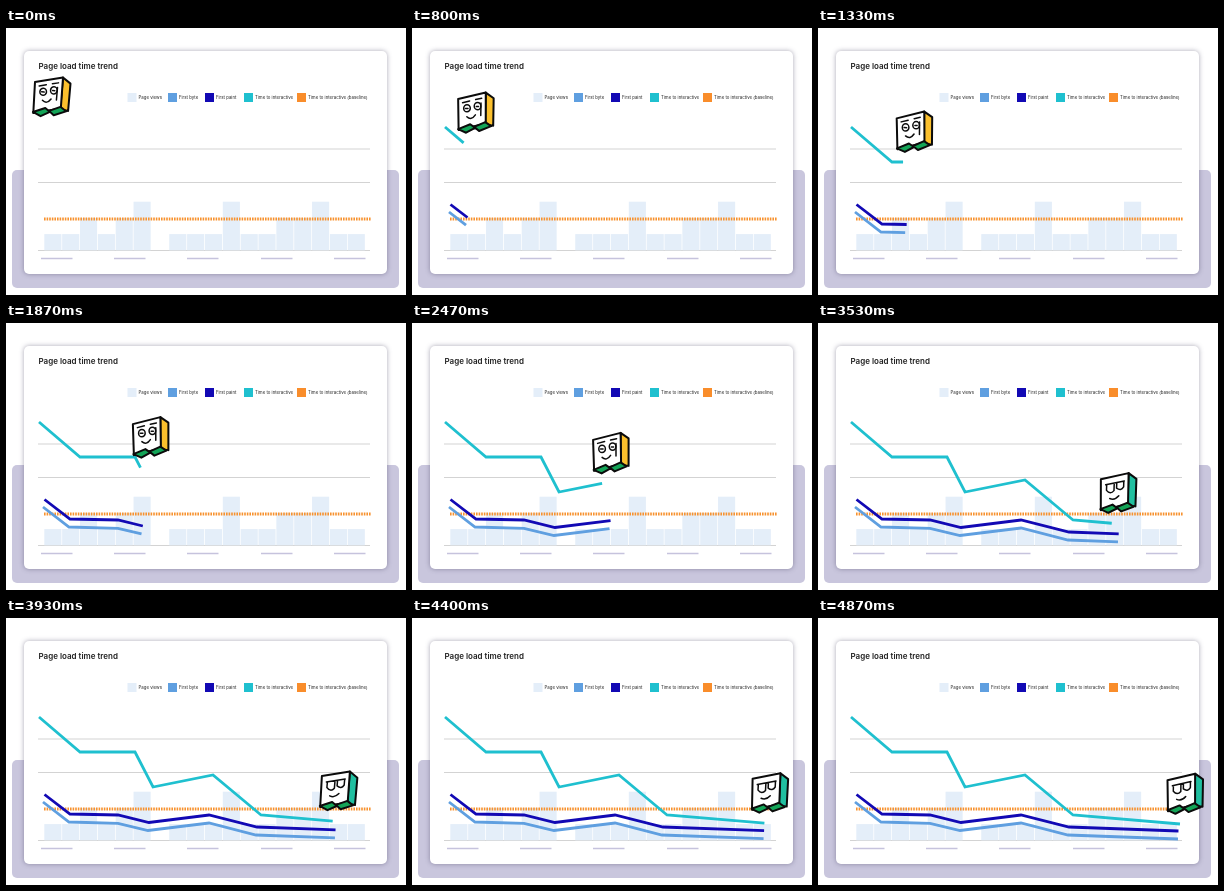
Recreate the animation shown at these times as an HTML page. Size 400x267 px, loop 4940 ms.

```html
<!DOCTYPE html>
<html lang="en">
<head>
<meta charset="utf-8">
<title>Page load time trend</title>
<style>
  html, body { margin: 0; width: 100%; height: 100%; overflow: hidden; background: #fff; }
  svg { display: block; width: 100%; height: 100%; }
  text { font-family: Inter, sans-serif; fill: #222; }
  .card { filter: drop-shadow(0 0 2.5px rgba(40, 35, 70, .4)); }
  .series { fill: none; stroke-width: 2.8; }
  .ink { fill: none; stroke: #0b0b0b; stroke-width: 1.5; stroke-linecap: round; stroke-linejoin: round; }
  .box { stroke: #0b0b0b; stroke-width: 2; stroke-linejoin: round; }
</style>
</head>
<body>
<svg viewBox="0 0 400 267">
  <rect x="6" y="142" width="387" height="118" rx="5" fill="#c9c6dd"/>
  <rect class="card" x="18" y="23" width="363" height="223" rx="5" fill="#fff"/>
  <text x="32.5" y="41" font-size="8" font-weight="600">Page load time trend</text>
  <g id="legend"></g>
  <path d="M32 121H364M32 154.5H364M32 222.5H364" stroke="#cfcfcf" stroke-width=".9"/>
  <g id="bars" fill="#e4eef9"></g>
  <path id="ticks" stroke="#c6c3dd" stroke-width="1.6"/>
  <path d="M38 191H365" stroke="#f7922f" stroke-width="2.8" stroke-dasharray="1.6 1"/>
  <g id="lines"></g>
  <g id="mascot">
    <path class="box" id="side" d="M10 -20L18 -14.5V13L10 12Z"/>
    <path class="box" fill="#fff" d="M-17.5 -13L10 -20L10.5 11L-16.5 18Z"/>
    <g id="calmFace" class="ink">
      <path d="M-13 -9.5L-6 -11.3M0 -12.8L6 -14.2"/>
      <ellipse cx="-8.5" cy="-4" rx="3.3" ry="3.6"/>
      <ellipse cx="2" cy="-6.3" rx="3.3" ry="3.6"/>
      <path d="M5.4 -9.5V3M-10 -3.8H-7.5M.8 -6H3M-8.5 4.5Q-4 8.5 0 2.5"/>
    </g>
    <g id="coolFace" class="ink">
      <path d="M-12.5 -7.5L6 -12M-11.5 -7.5V-2Q-7.5 2.5 -4 -2V-9.5M-1.5 -10V-4.5Q3 -1.5 5.5 -6V-11.8M-8 6Q-3 8 1 3"/>
    </g>
    <path class="box" fill="#13a457" stroke-width="1.5" d="M-17 17L-5 12L0 15.5L-9 20.5ZM-1 14.5L10 9.5L16 13.5L4 18.5Z"/>
  </g>
</svg>
<script>
const LOOP = 4940, DRAW_TIME = 4900, FACE_CHANGE = 2800;
const $ = id => document.getElementById(id);

function add(parent, tag, attrs, text = '') {
  const node = document.createElementNS('http://www.w3.org/2000/svg', tag);
  for (const [name, value] of Object.entries(attrs)) node.setAttribute(name, value);
  node.textContent = text;
  return parent.appendChild(node);
}

[
  ['Page views', 121.5, '#e4eef9'],
  ['First byte', 162, '#5f9fe0'],
  ['First paint', 199, '#1209b4'],
  ['Time to interactive', 238, '#1fc0cf'],
  ['Time to interactive (baseline)', 291, '#f98d2b']
].forEach(([label, x, fill]) => {
  add($('legend'), 'rect', { x, y: 65, width: 9, height: 9, fill });
  add($('legend'), 'text', { x: x + 11, y: 70.6, 'font-size': 4.35 }, label);
});

// Bar heights in steps; 0 leaves a gap.
[1, 1, 2, 1, 2, 3, 0, 1, 1, 1, 3, 1, 1, 2, 2, 3, 1, 1].forEach((level, i) => {
  if (!level) return;
  const height = level * 16.2;
  add($('bars'), 'rect', { x: 38.3 + i * 17.85, y: 222.3 - height, width: 17.1, height });
});

$('ticks').setAttribute('d', [35, 108, 181, 255, 328].map(x => `M${x} 230.5h31.5`).join(''));

const series = [
  ['#5f9fe0', '37,184 63,204 112,205.3 142,212.5 203,205 250,217 360,221'],
  ['#1209b4', '38.5,176.5 64,196 112,197 143,204.5 203,197 251,209 360.5,213'],
  ['#1fc0cf', '33,99 74,134 129,134 147,169 207,157 255,197 362,206']
].map(([stroke, points]) => {
  const line = add($('lines'), 'polyline', { class: 'series', stroke, points });
  return { line, length: line.getTotalLength() };
});
const lead = series[2];

const tilts = [[0, 5], [800, 1], [1870, 0], [2470, 0], [3130, -1], [3930, 5], [4870, 1], [LOOP, 1]];

function tiltAt(time) {
  const next = tilts.findIndex(([at]) => at > time);
  const [t0, a0] = tilts[next - 1], [t1, a1] = tilts[next];
  return a0 + (a1 - a0) * (time - t0) / (t1 - t0);
}

function render(time) {
  const progress = (1 - Math.cos(Math.PI * Math.min(time / DRAW_TIME, 1))) / 2;
  for (const { line, length } of series) {
    line.setAttribute('stroke-dasharray', `${progress * length} ${length + 9}`);
    line.setAttribute('visibility', progress > 0 ? 'visible' : 'hidden');
  }

  const tip = lead.line.getPointAtLength(progress * lead.length);
  const x = tip.x + 12.3 - 7.5 * progress, y = tip.y - 30.5;
  $('mascot').setAttribute('transform', `translate(${x} ${y}) rotate(${tiltAt(time)})`);

  const cool = time >= FACE_CHANGE;
  $('side').setAttribute('fill', cool ? '#20bfa0' : '#fbc02d');
  $('calmFace').setAttribute('visibility', cool ? 'hidden' : 'visible');
  $('coolFace').setAttribute('visibility', cool ? 'visible' : 'hidden');
}

const start = performance.now();
function tick() {
  render((performance.now() - start) % LOOP);
  requestAnimationFrame(tick);
}
render(0);
requestAnimationFrame(tick);
</script>
</body>
</html>
```
